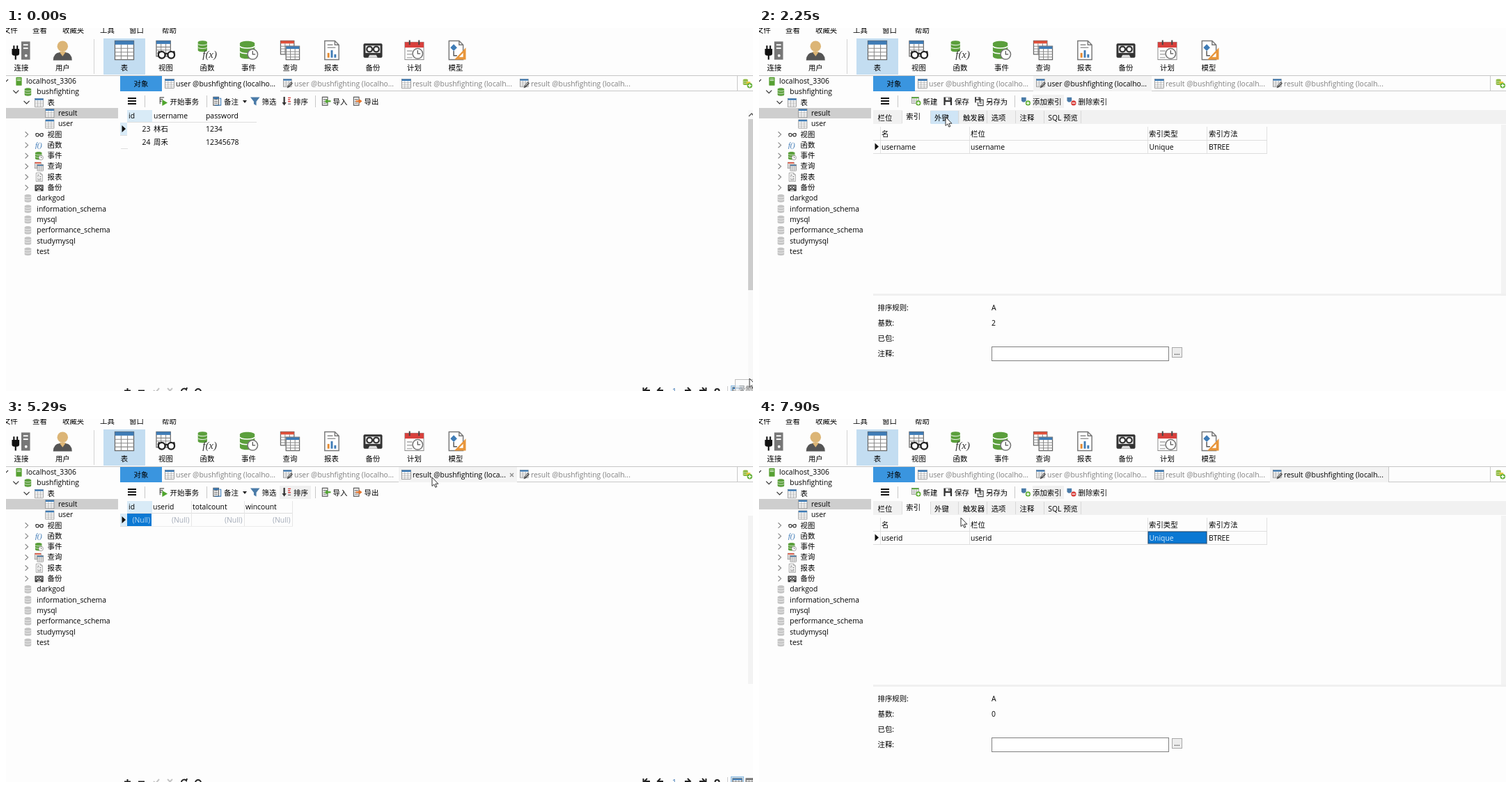
Animation of 1073 by 522 pixels, one loop 8000 ms. Source, as an HTML page:

```html
<!DOCTYPE html>
<html lang="zh">
<head>
<meta charset="utf-8">
<title>Database tables</title>
<style>
html, body { margin: 0; width: 100%; height: 100%; overflow: hidden; background: #fdfdfd; }
svg { display: block; width: 1073px; height: 522px; }
text { font: 10.4px "Open Sans", "Noto Sans CJK SC", "Noto Sans CJK", sans-serif; white-space: pre; }
</style>
</head>
<body>
<svg id="stage" viewBox="0 0 1073 522"><g id="frame"></g><g id="view"></g></svg>
<script>
const rect = (x, y, w, h, fill, more = '') =>
  `<rect x="${x}" y="${y}" width="${w}" height="${h}" fill="${fill}" ${more}/>`;
const path = (d, stroke = '#444', width = 1, fill = 'none') =>
  `<path d="${d}" stroke="${stroke}" stroke-width="${width}" fill="${fill}"/>`;
const shape = (d, fill) => path(d, 'none', 0, fill);
const disc = (x, y, r, fill, stroke = 'none', width = 1) =>
  `<circle cx="${x}" cy="${y}" r="${r}" fill="${fill}" stroke="${stroke}" stroke-width="${width}"/>`;
const text = (x, y, s, fill = '#000', anchor = 'start') =>
  `<text x="${x}" y="${y}" fill="${fill}" text-anchor="${anchor}">${s}</text>`;
const hline = (x, y, w, c = '#dedede') => rect(x, y, w, 1, c);
const vline = (x, y, h, c = '#dedede') => rect(x, y, 1, h, c);

// Icons live in a 30 x 30 box
const table = (x, y, w, h, head) => rect(x, y, w, h, '#fff', 'stroke="#666" stroke-width="1.3"') +
  rect(x, y, w, h * .2, head) +
  path([.4, .6, .8].map(f => `M${x} ${y + h * f}h${w}`).join('') +
    [.33, .67].map(f => `M${x + w * f} ${y + h * .2}v${h * .8}`).join(''), '#8a8a8a', 1.1);
const drum = c => shape('M2 5C2 0 24 0 24 5V24C24 29 2 29 2 24Z', c) +
  path('M2 9C4 13 22 13 24 9M2 17C4 21 22 21 24 17', '#fff', 1.6);
const clock = (x, y) => disc(x, y, 7.5, '#fff', '#777', 1.6) + path(`M${x} ${y - 5}v5h4`, '#555', 1.3);
const page = shape('M5 1H20L26 7V29H5Z', '#fff') + path('M5 1H20L26 7V29H5ZM20 1V7H26', '#777', 1.5);
const plus = disc(22, 21, 8, '#5fae32') + path('M22 16v10M17 21h10', '#fff', 3);
const glasses = disc(9, 22, 5, '#fff', '#222', 2.4) + disc(23, 22, 5, '#fff', '#222', 2.4) +
  path('M14 21q2-2 4 0M4 20l1-4M28 20l-1-4', '#222', 2);
const script = (s, x, y, size, fill) =>
  `<text x="${x}" y="${y}" fill="${fill}" style="font:italic ${size}px 'Liberation Serif',serif">${s}</text>`;
const floppy = shape('M2 2H25L28 5V28H2Z', '#333') + rect(8, 3, 14, 9, '#fff') + rect(7, 17, 16, 11, '#fff') + rect(17, 4, 3, 6, '#333');
const sheet = path('M3 2H20V28H3ZM6 9H17M6 15H17M6 21H17', '#555', 2.4);
const arrow = (d, c) => path(d, c, 5);

const icons = {
  table: table(1, 1, 28, 28, '#3f7cb6'),
  design: table(1, 1, 25, 24, '#3f7cb6') + shape('M12 29L14 21 25 9 30 14 19 26Z', '#555') + path('M17 21l8-8', '#fff', 2),
  server: rect(9, 1, 19, 28, '#56a031', 'rx="2"') + path('M12 7h13M12 12h13', '#fff', 2),
  conn: rect(15, 2, 13, 27, '#777') + rect(18, 6, 7, 2, '#fff') + rect(18, 11, 7, 2, '#fff') + disc(22, 23, 2, '#fff') +
    shape('M1 13H12V20Q12 23 8 23H5Q1 23 1 20Z', '#111') + path('M4 8v6M9 8v6M6.5 22v7', '#111', 2.2),
  user: shape('M1 30Q1 19 11 18H19Q29 19 29 30Z', '#555') + shape('M10 17h10l-5 7Z', '#dcb576') + disc(15, 9, 8, '#dcb576'),
  view: table(1, 1, 21, 23, '#3f7cb6') + glasses,
  glasses: `<g transform="translate(0 -6)">${glasses}</g>`,
  func: `<g transform="scale(.62)">${drum('#5b9f3c')}</g>` + script('f(x)', 8, 26, 15.5, '#333'),
  fx: script('f()', 2, 24, 24, '#2f6fb0'),
  db: drum('#5b9f3c'),
  off: drum('#c4c4c4'),
  event: drum('#5b9f3c') + clock(21, 21),
  query: table(1, 1, 20, 20, '#e0503a') + table(9, 9, 20, 20, '#e58a2f') + rect(9, 9, 20, 4, '#3f7cb6'),
  report: page + path('M9 7h8M9 11h12', '#888', 1.5) + rect(9, 19, 3, 7, '#e58a2f') + rect(14, 15, 3, 11, '#3f7cb6') + rect(19, 21, 3, 5, '#3f7cb6'),
  reportGray: page + path('M9 8h7M9 13h4M16 13h6M9 19h4M16 19h6M9 24h13', '#666', 2),
  backup: rect(1, 5, 28, 21, '#333', 'rx="2"') + rect(4, 8, 22, 11, '#e8e8e8') + disc(10, 13.5, 4, '#fff', '#333', 2.4) +
    disc(20, 13.5, 4, '#fff', '#333', 2.4) + shape('M8 26l2-4h10l2 4Z', '#ddd'),
  plan: rect(1, 3, 28, 26, '#fff', 'stroke="#888"') + rect(1, 3, 28, 8, '#d8403c') + path('M8 0v7M22 0v7', '#444', 2) +
    path('M4 16h8M4 21h8M4 26h8', '#bbb', 2) + clock(20, 20),
  model: page + shape('M12 6l5 5-5 5-5-5Z', '#3f7cb6') + path('M12 16v7h5', '#555', 1.5) + shape('M30 11V29H13Z', '#e8963b') + shape('M26 19v6h-6Z', '#fff'),
  start: path('M4 3H18M4 9H14M4 15H10', '#555', 3) + path('M5 3V24', '#555', 2.4) + shape('M12 10L29 20 12 30Z', '#4fa52e'),
  note: sheet + rect(3, 2, 17, 6, '#3f7cb6') + path('M22 6h5v22h-19', '#3f7cb6', 2.5),
  filter: shape('M0 2H30L19 16V29L11 24V16Z', '#4a7ba8'),
  sort: arrow('M7 1V23', '#333') + shape('M0 19H14L7 29Z', '#333') + path('M19 4h9M19 10h7M19 16h9', '#d8403c', 3) + path('M19 24h9', '#777', 3),
  into: sheet + arrow('M30 15H18', '#4fa52e') + shape('M20 7V23L10 15Z', '#4fa52e'),
  out: sheet + arrow('M10 15H22', '#e5732a') + shape('M20 7V23L30 15Z', '#e5732a'),
  add: table(1, 2, 22, 20, '#4fa52e') + plus,
  save: floppy,
  saveAs: `<g transform="scale(.7)">${floppy}</g>` + path('M14 11H28V29H11V19', '#444', 2.6) + path('M16 17h8M16 22h8', '#444', 2),
  keyAdd: shape('M1 3H16V14L11 18H5L1 14Z', '#4a7ba8') + plus,
  keyDel: shape('M1 3H16V14L11 18H5L1 14Z', '#4a7ba8') + disc(22, 21, 8, '#d8403c') + path('M17 21h10', '#fff', 3),
  tabAdd: `<g transform="scale(.7)">${drum('#8bb83c')}</g>` + shape('M12 9h12v7H12Z', '#e8c53b') + plus
};
const icon = (name, x, y, size = 13) => `<g transform="translate(${x} ${y}) scale(${size / 30})">${icons[name]}</g>`;

function frame() {
  let s = '';
  [['文件', -4], ['查看', 38], ['收藏夹', 81], ['工具', 135], ['窗口', 177], ['帮助', 224]]
    .forEach(([w, x]) => s += text(x, 7, w));
  s += rect(140, 15, 60, 52, '#c3ddf1') + vline(126, 16, 50, '#d4d4d4');
  [['连接', 'conn'], ['用户', 'user'], , ['表', 'table'], ['视图', 'view'], ['函数', 'func'], ['事件', 'event'],
   ['查询', 'query'], ['报表', 'report'], ['备份', 'backup'], ['计划', 'plan'], ['模型', 'model']]
    .forEach(([w, name], i) => {
      const x = i < 2 ? 22 + 59.3 * i : 170 + 59.5 * (i - 3);
      s += icon(name, x - 14.5, 17.5, 29) + text(x, 60.5, w, '#000', 'middle');
    });
  s += hline(0, 68, 1073, '#c6c6c6') + rect(0, 115, 161, 15, '#cecece');
  [['localhost_3306', 'server', 0], ['bushfighting', 'db', 1, 'v'], ['表', 'table', 2, 'v'], ['result', 'table', 3], ['user', 'table', 3],
   ['视图', 'glasses', 2, '>'], ['函数', 'fx', 2, '>'], ['事件', 'event', 2, '>'], ['查询', 'query', 2, '>'], ['报表', 'reportGray', 2, '>'],
   ['备份', 'backup', 2, '>'], ...['darkgod', 'information_schema', 'mysql', 'performance_schema', 'studymysql', 'test'].map(n => [n, 'off', 1])]
    .forEach(([w, name, depth, mark], i) => {
      const x = 29 + 15.3 * depth, y = 76.3 + 15.3 * i, m = x - 30;
      s += text(x, y + 3.7, w) + icon(name, x - 18.5, y - 6);
      if (mark) s += path(mark == 'v' ? `M${m - 4} ${y - 2}l4 4 4-4` : `M${m - 2} ${y - 3.5}l4 3.8-4 3.8`, mark == 'v' ? '#333' : '#888', 1.2);
    });
  s += path('M-4 75l3 3 4-4', '#333', 1.2);
  s += rect(164, 69, 60, 22, '#3a95df') + text(194, 83.5, '对象', '#000', 'middle');
  s += vline(1050, 69, 22, '#c8c8c8') + icon('tabAdd', 1058, 73, 14);
  return s + path('M175 101h12M175 105h12M175 109h12', '#111', 2);
}

function tabs(active, cur) {
  let s = '';
  for (let i = 0; i < 4; i++) {
    const x = 224 + 170 * i, on = i == active;
    const hover = cur[1] > 69 && cur[1] < 91 && cur[0] > x && cur[0] < x + 170;
    const tail = i < 2 ? ['localho...', 'local...'] : ['localh...', 'loca...'];
    s += rect(x, 69, 170, 22, on && i || hover ? '#f3f3f3' : '#fdfdfd');
    if (!on) s += hline(x, 90, 170, '#c8c8c8');
    if (i < 3 || on) s += vline(x + 170, 69, 22, '#c8c8c8');
    s += icon(i % 2 ? 'design' : 'table', x + 4, 73, 14);
    s += text(x + 20, 83.5, `${i < 2 ? 'user' : 'result'} @bushfighting (${tail[+hover]}`, on ? '#000' : '#808080');
    if (hover) s += path(`M${x + 160} 78l5 5m0-5l-5 5`, '#888', 1.2);
  }
  return s + hline(904, 90, 169, '#c8c8c8');
}

const tools = list => list.map(([w, name, x]) => icon(name, x, 98.5, 13.5) + text(x + 16.5, 109.5, w)).join('');
const marker = y => shape(`M166.5 ${y - 5}v10l5.5-5Z`, '#111');

function footer() {
  const left = x => `M${x + 5} 521h-8m4-4l-4 4 4 4`, right = x => `M${x - 5} 521h8m-4-4l4 4-4 4`;
  return path('M170 521.5h9M174.5 518v8M190 521.5h9', '#222', 2) +
    path('M212 521l3 3 5-6M232 518l7 7m0-7l-7 7', '#c4c4c4', 2) +
    path('M252 523a4 4 0 0 1 7-3l1-3M272 523a4 4 0 1 1 4 4M274 523l5 0', '#222', 2) +
    path(left(920) + 'M915.5 517v9' + left(939) + right(980) + right(1001) + 'M1005.5 517v9', '#222', 2) +
    text(957, 526, '1', '#2f6fb0') + disc(1021.5, 522, 3, 'none', '#222', 2) + vline(1036, 515, 7, '#ccc') +
    rect(1041.5, 514.5, 18, 12, '#cfe5f6', 'stroke="#8dbbe0"') + table(1044, 517, 13, 12, '#3f7cb6') + table(1063, 517, 13, 12, '#777');
}

function dataView(second, hot) {
  let s = hot ? rect(393, 96, 45, 19, '#f0f0f0') : '';
  s += tools([['开始事务', 'start', 219], ['备注', 'note', 296.5], ['筛选', 'filter', 351], ['排序', 'sort', 396.5], ['导入', 'into', 453], ['导出', 'out', 498]]);
  s += [199, 288, 444].map(x => vline(x, 97, 17, '#c8c8c8')).join('') + shape('M340 104h6l-3 4Z', '#222');
  s += rect(174, 118, 36, 17, '#d9ebf7') + rect(164, 136, 10, 18, '#d9ebf7') + marker(145);
  const end = second ? 412 : 360;
  s += hline(174, 135, end - 174) + hline(164, 154, 10) + text(176, 130, 'id');
  if (second) {
    s += hline(174, 154, end - 174, '#ececec') + rect(174, 136, 35, 18, '#0b78d3');
    s += text(207, 148.5, '(Null)', '#b9d9f3', 'end');
    [['userid', 211, 267], ['totalcount', 268, 343], ['wincount', 344, 412]].forEach(([w, x, r]) =>
      s += text(x, 130, w) + text(r - 3.5, 148.5, '(Null)', '#a3abb8', 'end') + vline(r - 1, 118, 36, '#e6e6e6'));
    s += rect(1066, 139, 7, 242, '#f3f3f3');
  } else {
    s += text(212, 130, 'username') + text(287, 130, 'password') + hline(165, 173, 10);
    [['23', '林石', '1234'], ['24', '周禾', '12345678']].forEach((row, i) => {
      const y = 149 + 18.5 * i;
      s += text(207.5, y, row[0], '#000', 'end') + text(212, y, row[1]) + text(287, y, row[2]);
    });
    s += rect(1066, 118, 7, 396, '#f8f8f8') + rect(1066, 131, 7, 246, '#cdcdcd') + path('M1067 127l4-4 4 4', '#555', 1.3);
  }
  return s + footer();
}

function designView(field, count, edit, blink, cur) {
  let s = rect(393, 96, 45, 19, '#f1f1f1');
  s += tools([['新建', 'add', 219], ['保存', 'save', 264.5], ['另存为', 'saveAs', 309.5], ['添加索引', 'keyAdd', 376.5], ['删除索引', 'keyDel', 442]]);
  s += vline(199, 97, 17, '#c8c8c8') + vline(367, 97, 17, '#c8c8c8') + rect(164, 118, 909, 20, '#f1f1f1');
  ['栏位', '索引', '外键', '触发器', '选项', '注释', 'SQL 预览'].forEach((w, i) => {
    const x = 165 + 40.8 * i, width = i == 6 ? 53 : 40.8, on = i == 1;
    const hover = cur[1] > 118 && cur[1] < 138 && cur[0] > x && cur[0] < x + width;
    if (on || hover) s += rect(x, on ? 117 : 119, width, on ? 22 : 19, on ? '#fdfdfd' : '#cfe5f6');
    s += vline(Math.round(x + width) - 1, 119, 18, '#d8d8d8') + text(x + 5.5, on ? 131 : 132.5, w);
  });
  s += [174, 302, 558, 643, 729].map(x => vline(x, 142, 38, '#e2e2e2')).join('') + hline(164, 161, 566) + hline(164, 180, 566);
  [['名', 176], ['栏位', 304], ['索引类型', 560], ['索引方法', 646]].forEach(([w, x]) => s += text(x, 155.5, w));
  const picked = field == 'userid';
  if (picked) s += rect(559, 162, 84, 17, '#0b78d3', 'stroke="#234a70"');
  s += marker(170.5) + text(176, 174.5, field) + text(304, 174.5, field) +
    text(560.5, 174.5, 'Unique', picked ? '#d8ecfc' : '#000') + text(646, 174.5, 'BTREE');
  if (edit) {
    s += rect(629.5, 162.5, 13, 16, '#e6e6e6', 'stroke="#aaa"') + path('M633 169l3 3 3-3', '#444', 1.2);
    if (blink) s += vline(595, 164, 14, '#111');
  }
  s += rect(1066, 139, 7, 243, '#f3f3f3') + rect(164, 382, 909, 3, '#f0f0f0');
  ['排序规则:', '基数:', '已包:', '注释:'].forEach((w, i) => s += text(170.5, 406 + 22 * i, w));
  s += text(334, 406, 'A') + text(334, 428, count) + rect(334.5, 458.5, 254, 20, '#fff', 'stroke="#808080"');
  return s + rect(593.5, 459.5, 14, 14, '#ececec', 'stroke="#a8a8a8"') + text(600.5, 469.5, '...', '#000', 'middle');
}

// Pointer stops: step, x, y
const route = [[0, 1068, 504], [1, 1040, 505], [2, 820, 494], [3, 514, 386], [4, 482, 312], [5, 446, 168], [6, 412, 110], [7, 404, 98],
  [8, 430, 84], [9, 432, 82], [11, 432, 82], [12, 436, 100], [13, 443, 150], [15, 418, 180], [16, 352, 193], [17, 305, 172], [18, 268, 128],
  [19, 252, 126], [21, 224, 120], [23, 226, 162], [24, 216, 164], [26, 338, 182], [28, 470, 180], [30, 597, 172], [34, 593, 171],
  [36, 535, 128], [37, 500, 90], [38, 472, 84], [39, 490, 82], [41, 610, 83], [42, 612, 84], [43, 612, 96], [45, 450, 140], [48, 224, 148],
  [49, 222, 150], [51, 640, 168], [52, 818, 151], [54, 806, 92], [55, 812, 83], [56, 814, 84], [57, 812, 95], [59, 610, 158], [62, 312, 151], [63, 290, 142]];

function pointer(step) {
  const i = Math.max(1, route.findIndex(p => p[0] >= step));
  const [a, x0, y0] = route[i - 1], [b, x1, y1] = route[i], f = (step - a) / (b - a);
  return [x0 + (x1 - x0) * f, y0 + (y1 - y0) * f];
}

function draw(step) {
  const cur = pointer(step);
  const active = step < 9 ? 0 : step < 42 ? 1 : step < 56 ? 2 : 3;
  let s = tabs(active, cur);
  if (active % 2) {
    const edit = active == 1 && step >= 32;
    s += active == 1 ? designView('username', 2, edit, step % 8 < 6, cur) : designView('userid', 0, false, false, cur);
  } else s += dataView(active == 2, step >= 7);
  if (!step) s += rect(1047.5, 505.5, 30, 20, '#fdfdfd', 'stroke="#c0c0c0" fill-opacity=".7"') + text(1052, 523, '录制', '#888');
  return s + `<g transform="translate(${cur})">` +
    path('M0 0V12.5L2.9 9.9 4.9 14.3 6.8 13.4 4.9 9.2H8.9Z', '#333', 1, '#fff') + '</g>';
}

document.getElementById('frame').innerHTML = frame();
const view = document.getElementById('view');
const begin = performance.now();
let last = -1;
function tick() {
  const step = Math.floor((performance.now() - begin) % 8000 / 125);
  if (step != last) view.innerHTML = draw(last = step);
  requestAnimationFrame(tick);
}
tick();
</script>
</body>
</html>
```
